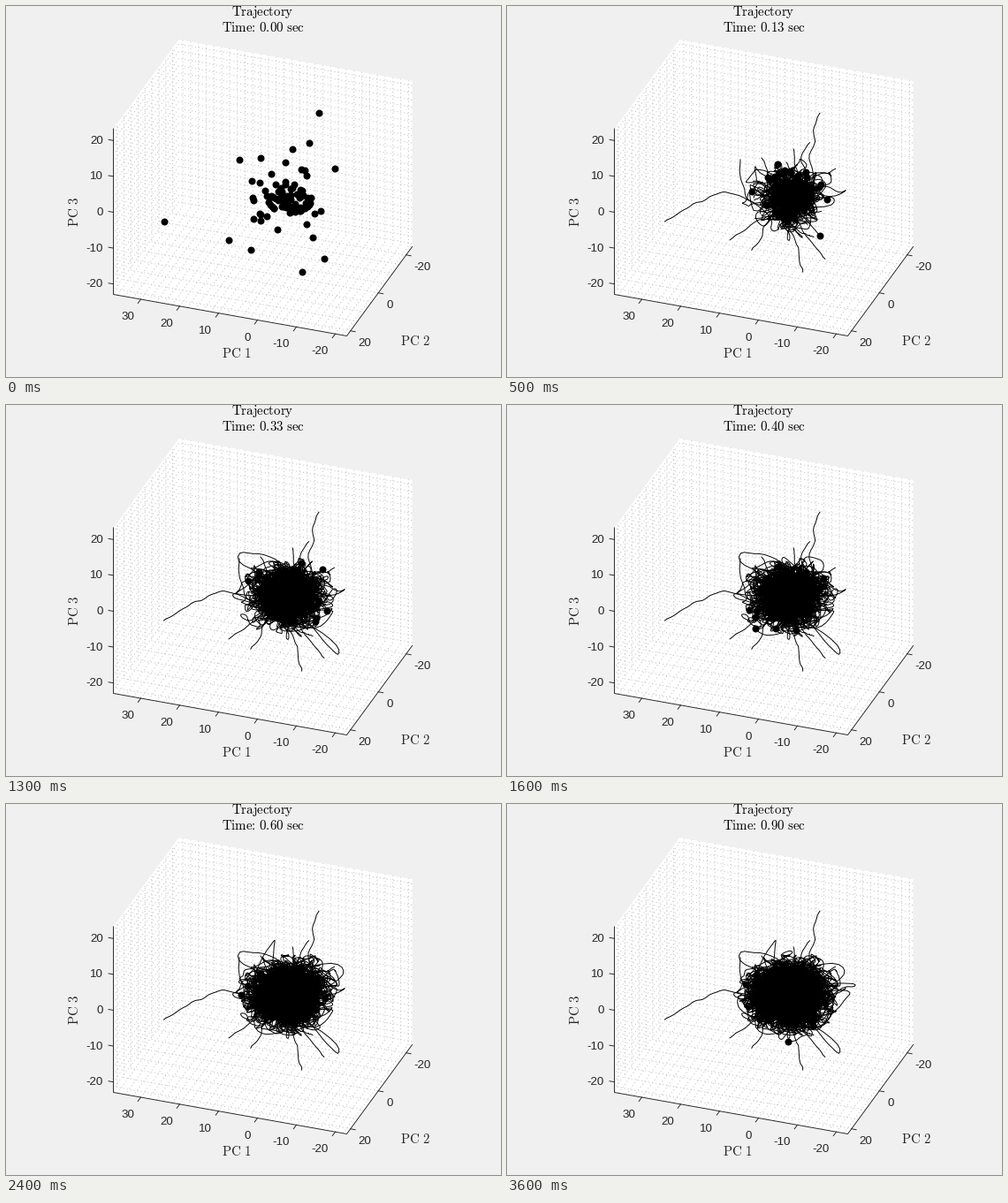
A matplotlib script for the animation above (3.7 s loop, 560 px wide and 420 px high).

```python
import matplotlib.pyplot as plt
import numpy as np
from matplotlib.animation import FuncAnimation

W, H, DPI = 560, 420, 96
FRAMES, SUB, N = 37, 12, 100
INK = "#262626"
plt.rcParams["mathtext.fontset"] = "cm"
plt.rcParams["font.family"] = "Liberation Sans"

rng = np.random.default_rng(12)
T = np.arange((FRAMES - 1) * SUB + 1) / SUB
CENTER = np.array([318.0, 216.0])
SPREAD = np.array([15, 12.8])

# Far starting points: x, y, sideways bow of the way in
FAR = [(178, 243, 24), (252, 264, 8), (277, 276, 0), (334, 301, 0),
       (360, 285, 0), (353, 120, 0), (343, 154, 0), (372, 184, 0),
       (263, 173, -32), (324, 160, 0), (288, 171, 0), (348, 261, 0)]

# Widest excursions: time, x, y
TIPS = [(3.7, 381, 208), (5.5, 377, 280), (8.4, 255, 217), (12, 264, 167),
        (19, 380, 185), (22.6, 304, 153), (25.8, 394, 203), (27.4, 381, 222)]


def gauss(width):
    g = np.arange(-8, 9) / SUB
    return np.exp(-(g / width) ** 2 / 2)


def noise(kernel):
    """Unit-variance noise for every path, smoothed by the kernel."""
    kernel = kernel / np.sqrt((kernel ** 2).sum())
    white = rng.normal(size=(len(T) + len(kernel) - 1, N, 2))
    return np.apply_along_axis(np.convolve, 0, white, kernel, "valid")


def wander():
    """Mean-reverting walks with long tails and a soft outer limit."""
    decay = np.exp(-np.arange(9 * SUB) / SUB / 1.5)
    z = noise(np.convolve(decay, gauss(.13)))
    z *= 1 + .025 * (z ** 2).sum(2, keepdims=True)
    r = np.sqrt((z ** 2).sum(2, keepdims=True))
    z /= (1 + (r / 4.2) ** 6) ** (1 / 6)
    return CENTER + z * SPREAD


def normal_to(d):
    return np.array([d[1], -d[0]]) / np.hypot(*d)


def fly_in(path, x, y, bow=0):
    """Start at (x, y) and blend into the walk."""
    start = np.array([x, y])
    d = CENTER - start
    u = np.clip(T / (.8 + np.hypot(*d) / 60), 0, 1)[:, None]
    path += (1 - u) * (start - path)
    path += bow * np.sin(np.pi * u) * normal_to(d)


def swing_out(path, t0, x, y):
    """Loop out to (x, y) at time t0 and back."""
    d = np.array([x, y]) - path[int(t0 * SUB)]
    s = ((T - t0) / .6)[:, None]
    path += np.exp(-s ** 2) * (d + 14 * s * normal_to(d))


def ring(count, rx, ry, inner, power):
    a = rng.uniform(0, 2 * np.pi, count)
    r = inner + (1 - inner) * rng.uniform(size=count) ** power
    return zip(CENTER[0] + rx * r * np.cos(a), CENTER[1] + ry * r * np.sin(a))


paths = wander()
starts = [*FAR, *ring(18, 48, 40, .7, 1), *ring(N - 18 - len(FAR), 28, 18, 0, .5)]
for i, start in enumerate(starts):
    fly_in(paths[:, i], *start)
for i, tip in enumerate(TIPS, N - len(TIPS)):
    swing_out(paths[:, i], *tip)
paths += .6 * noise(gauss(.08))

fig = plt.figure(figsize=(W / DPI, H / DPI), dpi=DPI, facecolor="#f0f0f0")
ax = fig.add_axes([0, 0, 1, 1])
ax.set(xlim=(-.5, W - .5), ylim=(H - .5, -.5))
ax.axis("off")

# Projected box: edge vectors and lower corners
EX, EY, EZ = np.array([264, 47]), np.array([74, -101]), np.array([0, -187.5])
LEFT = np.array([121, 326])
FRONT, BACK = LEFT + EX, LEFT + EY


def at_x(v):
    return LEFT + EX * (284 - 4.4 * v - 121) / 264


def at_y(v):
    return FRONT + EY * (35.7 - 1.575 * v) / 74


def at_z(v):
    return np.array([121, 233 - 4.06 * v])


def stroke(pts, **kw):
    return ax.plot(*np.array(pts).T, **kw)[0]


def grid(*pts):
    stroke(pts, color="#bdbdbd", lw=.75, ls=(0, (1, 3)), dash_capstyle="butt",
           zorder=1)


def ticks(at, values, out, shift, ha):
    out = np.array(out) * 5.5 / np.hypot(*out)
    for v in values:
        p = at(v)
        stroke([p, p + out], color=INK, lw=.7, zorder=2)
        ax.text(*(p + shift), str(v), color=INK, size=10, ha=ha, va="center")


def tex(s):
    return "$" + "~".join(rf"\text{{{w}}}" for w in s.split()) + "$"


def label(x, y, s, color=INK, **kw):
    return ax.text(x, y, tex(s), size=11.2, color=color, ha="center",
                   va="baseline", rotation_mode="anchor", **kw)


box = [LEFT, LEFT + EZ, BACK + EZ, BACK + EX + EZ, BACK + EX, FRONT]
ax.fill(*np.array(box).T, color="white", lw=0, zorder=0)
for v in range(-22, 37, 2):
    p = at_x(v)
    grid(p, p + EY, p + EY + EZ)
for v in range(-20, 21, 5):
    p = at_y(v)
    grid(p, p - EX, p - EX + EZ)
for v in range(-22, 23, 2):
    p = at_z(v)
    grid(p, p + EY, p + EY + EX)

stroke([LEFT + EZ, LEFT, FRONT, FRONT + EY], color=INK, lw=.7, zorder=2)
ticks(at_x, range(30, -21, -10), -EY, (-7.5, 20), "right")
ticks(at_y, (20, 0, -20), EX, (9, 14), "left")
ticks(at_z, range(-20, 21, 10), -EX, (-11.5, .5), "right")
label(260, 398, "PC 1")
label(462, 384, "PC 2")
label(81, 232, "PC 3", rotation=90)
label(290, 11, "Trajectory", "black")
clock = label(290, 29, "Time: 0.00 sec", "black")

trails = [stroke([(0, 0)], color="black", lw=.72, zorder=3) for _ in range(N)]
dots = stroke([(0, 0)], color="black", ls="", marker="o", ms=6, mew=0,
              zorder=4)


def draw(i):
    k = i * SUB
    for j, trail in enumerate(trails):
        trail.set_data(*paths[:k + 1, j].T)
    dots.set_data(*paths[k].T)
    hundredths = (5 * i + 1) // 2
    clock.set_text(tex(f"Time: {hundredths / 100:.2f} sec"))
    return [*trails, dots, clock]


anim = FuncAnimation(fig, draw, frames=FRAMES, interval=100, repeat=True)
plt.show()
```
